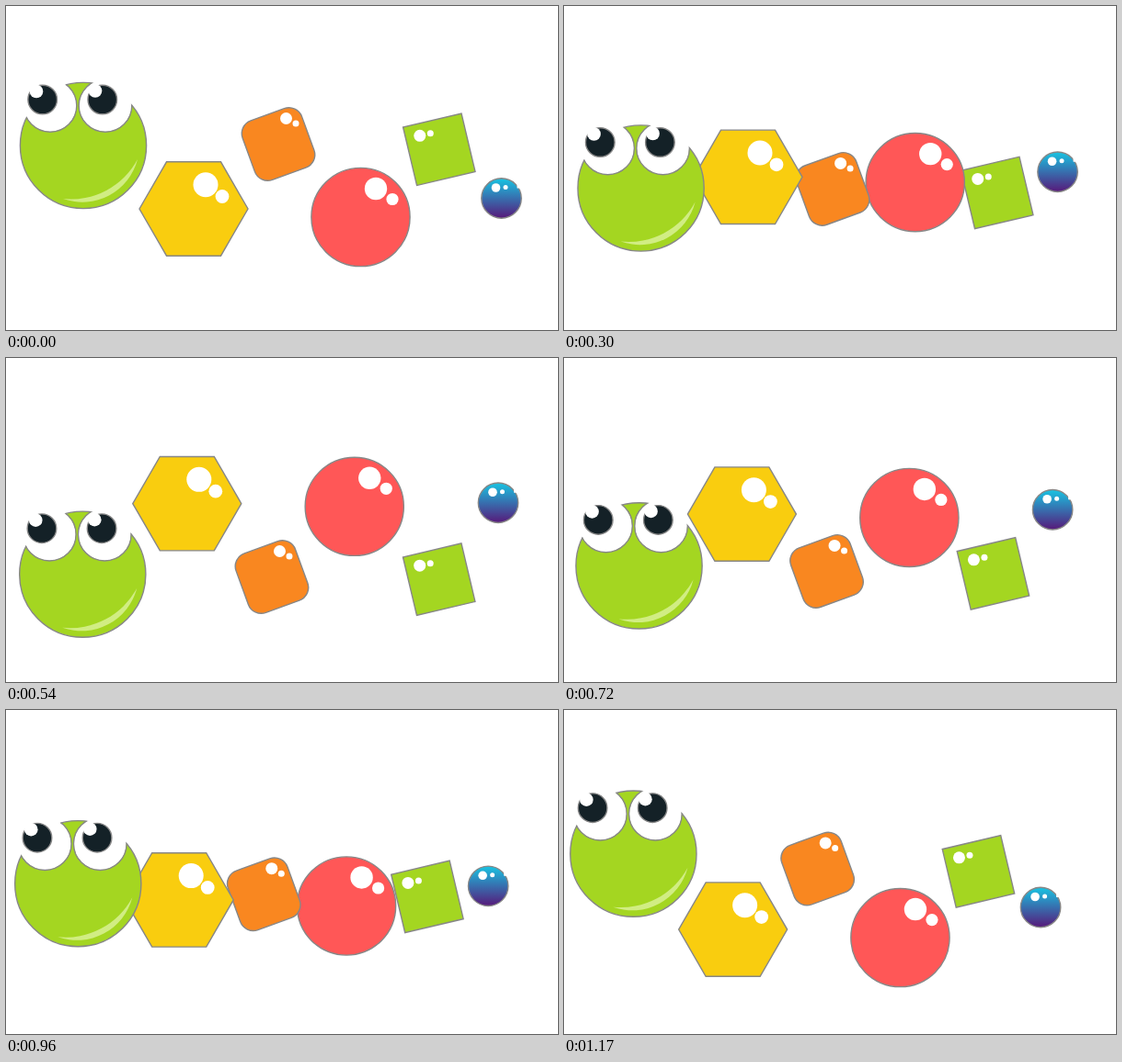
An HTML page that plays this animation: 600x353 px, repeating every 1200 ms.

```html
<!DOCTYPE html>
<html lang="en">
<head>
<meta charset="utf-8">
<title>Bouncing caterpillar</title>
<style>
  html, body { margin: 0; width: 100%; height: 100%; overflow: hidden; background: #fff; }
  svg { display: block; width: 100vw; height: 100vh; }
  .body { stroke: #878787; stroke-width: 1.4; }
  .shine { fill: #fff; }
</style>
</head>
<body>
<svg viewBox="0 0 600 353">
  <defs>
    <linearGradient id="dusk" x1="0" y1="0" x2="0" y2="1">
      <stop offset="0" stop-color="#18c4e2"/>
      <stop offset="1" stop-color="#57197a"/>
    </linearGradient>
    <clipPath id="face"><circle r="69"/></clipPath>
  </defs>

  <g id="ball">
    <circle class="body" r="21.7" fill="url(#dusk)"/>
    <g class="shine">
      <circle cx="-6" cy="-11.5" r="4.8"/>
      <circle cx="4.5" cy="-12" r="2.5"/>
      <rect x="17" y="-21" width="6" height="10"/>
    </g>
  </g>

  <g id="square">
    <rect class="body" x="-32.6" y="-32.6" width="65.2" height="65.2" fill="#a4d621" transform="rotate(-13.3)"/>
    <g class="shine">
      <circle cx="-21" cy="-15" r="6.5"/>
      <circle cx="-9.5" cy="-17.5" r="3.5"/>
    </g>
  </g>

  <g id="red">
    <circle class="body" r="53.6" fill="#ff5757"/>
    <g class="shine">
      <circle cx="16.5" cy="-31" r="12.2"/>
      <circle cx="34.5" cy="-19.5" r="6.6"/>
    </g>
  </g>

  <g id="orange">
    <rect class="body" x="-34.3" y="-34.3" width="68.6" height="68.6" rx="15" fill="#f98720" transform="rotate(-20)"/>
    <g class="shine">
      <circle cx="8.5" cy="-28" r="6.5"/>
      <circle cx="19" cy="-22.5" r="3.5"/>
    </g>
  </g>

  <g id="hexagon">
    <path class="body" d="M-59 0L-29.5-51.2H29.5L59 0L29.5 51.2H-29.5Z" fill="#f9cd0f"/>
    <g class="shine">
      <circle cx="13" cy="-26.3" r="13.5"/>
      <circle cx="31" cy="-13.5" r="7.4"/>
    </g>
  </g>

  <g id="head">
    <circle class="body" r="68.6" fill="#a4d621"/>
    <path d="M-22 58A62 62 0 0 0 59 15A82 82 0 0 1-22 58Z" fill="#d1ed83"/>
    <g class="shine">
      <circle cx="-36" cy="-43.5" r="28.5"/>
      <circle cx="24" cy="-43.5" r="28.5"/>
    </g>
    <g class="body" fill="none" clip-path="url(#face)">
      <circle cx="-36" cy="-43.5" r="28.8"/>
      <circle cx="24" cy="-43.5" r="28.8"/>
    </g>
    <g class="body" fill="#142127">
      <circle cx="-44.3" cy="-50" r="15.8"/>
      <circle cx="20.8" cy="-50" r="15.8"/>
    </g>
    <g class="shine">
      <circle cx="-51" cy="-59" r="7.3"/>
      <circle cx="13" cy="-59.5" r="7.3"/>
    </g>
  </g>
</svg>
<script>
const LOOP = 1200, STEP = 30;

// Centres at the start, the middle and the end of the loop
const paths = {
  head:    [[84, 152], [83.2, 245], [75, 152]],
  hexagon: [[204, 221], [196, 151.7], [183, 243.7]],
  orange:  [[296, 150.5], [288.2, 248.3], [275, 169]],
  red:     [[385.5, 230], [378, 154.2], [364.8, 253]],
  square:  [[470.8, 156.3], [470.7, 250.6], [449.4, 171.9]],
  ball:    [[538.5, 209.5], [534.6, 152], [517.2, 218.3]],
};

function draw(now) {
  const time = Math.floor(now % LOOP / STEP) * STEP;
  const progress = time / (LOOP / 2);
  const leg = Math.floor(progress), part = progress - leg;
  for (const [id, stops] of Object.entries(paths)) {
    const [x, y] = stops[leg].map((from, i) => from + (stops[leg + 1][i] - from) * part);
    document.getElementById(id).setAttribute('transform', `translate(${x} ${y})`);
  }
  requestAnimationFrame(draw);
}
draw(performance.now());
</script>
</body>
</html>
```
